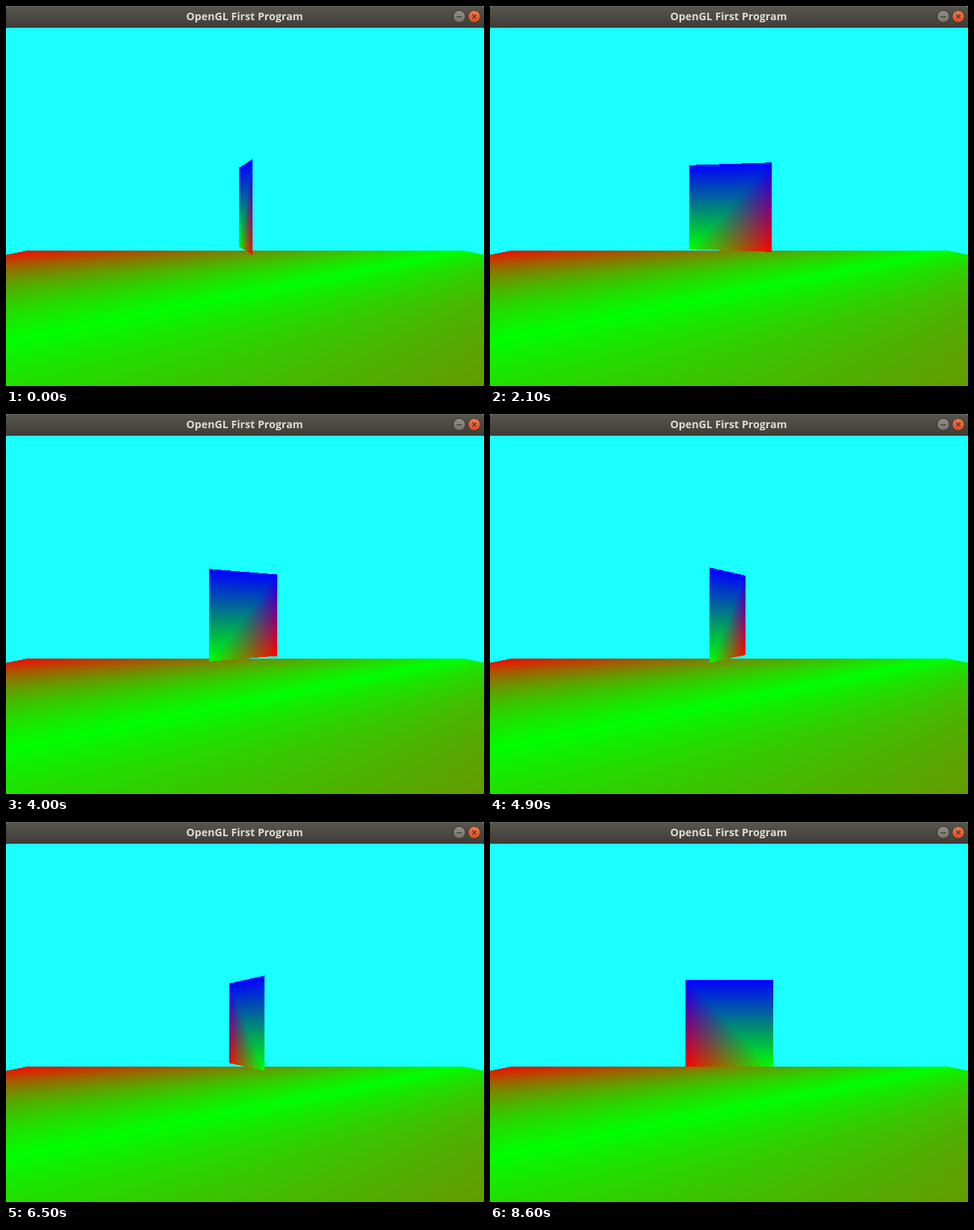
Animation of 638 by 508 pixels, one loop 8700 ms. Source, as an HTML page with a canvas:

```html
<!DOCTYPE html>
<html lang="en">
<head>
<meta charset="utf-8">
<title>OpenGL First Program</title>
<style>
  html, body { margin: 0; width: 100%; height: 100%; overflow: hidden; background: #fff; }
  svg, canvas { position: absolute; left: 0; display: block; }
  svg { top: 0; }
  canvas { top: 29px; }
  text { font: bold 14.2px "Open Sans", "Noto Sans", sans-serif; fill: #dfdbd2; }
</style>
</head>
<body>
<svg width="638" height="29" viewBox="0 0 638 29">
  <defs>
    <linearGradient id="bar" x2="0" y2="1">
      <stop stop-color="#58564e"/><stop offset="1" stop-color="#3d3c37"/>
    </linearGradient>
    <linearGradient id="grey" x2="0" y2="1">
      <stop stop-color="#918e85"/><stop offset="1" stop-color="#737169"/>
    </linearGradient>
    <linearGradient id="red" x2="0" y2="1">
      <stop stop-color="#f4784f"/><stop offset="1" stop-color="#de4c20"/>
    </linearGradient>
  </defs>
  <path d="M0 29V2Q0 0 2 0H636Q638 0 638 2V29Z" fill="url(#bar)"/>
  <path d="M2 .5H636" stroke="#67655d"/>
  <path d="M0 28.5H638" stroke="#373631"/>
  <text x="318.5" y="19" text-anchor="middle">OpenGL First Program</text>
  <g stroke="#33322d">
    <circle cx="605" cy="14" r="8.2" fill="url(#grey)"/>
    <circle cx="625" cy="14" r="8.2" fill="url(#red)"/>
    <path d="M601.5 14.5H608.5M622.3 11.3L627.7 16.7M627.7 11.3L622.3 16.7" fill="none" stroke-width="1.2"/>
  </g>
</svg>
<canvas id="view" width="638" height="479"></canvas>
<script>
const W = 638, H = 479;
const FX = 581, FY = 579.4;   // focal lengths in pixels
const CX = 319.2, CY = 240;   // vanishing point
const DIST = 10;              // camera to the spin axis
const STEP = 100, STEPS = 87;

const ctx = document.getElementById('view').getContext('2d');
const scene = ctx.createImageData(W, H);
const image = ctx.createImageData(W, H);

function put(target, x, y, r, g, b) {
  const i = (y * W + x) * 4;
  target.data[i] = r * 255;
  target.data[i + 1] = g * 255;
  target.data[i + 2] = b * 255;
  target.data[i + 3] = 255;
}

// Sky, and a floor one unit below the eye that ends under the spin axis
function buildScene() {
  for (let y = 0; y < H; y++) {
    const depth = FY / (y + 0.5 - CY);
    for (let x = 0; x < W; x++) {
      const fx = (x + 0.5 - CX) / FX * depth;
      if (depth > 0 && depth <= DIST && Math.abs(fx) <= 5) {
        const red = Math.abs(fx + 5 - depth) / 10;
        put(scene, x, y, red, 1 - red, 0);
      } else {
        put(scene, x, y, 0.1, 1, 1);
      }
    }
  }
}

// Two-triangle panel, blue along the top, red and green at the bottom corners
function drawPanel(angle) {
  const c = Math.cos(angle), s = Math.sin(angle);
  for (let x = 255; x < 385; x++) {
    const k = (x + 0.5 - CX) / FX;
    const u = DIST * k / (c + k * s);
    if (!(Math.abs(u) <= 1)) continue;
    const depth = DIST - u * s;
    const a = (1 - u) / 2;
    for (let y = 170; y < 310; y++) {
      const v = (1 - (y + 0.5 - CY) * depth / FY) / 2;
      if (v < 0 || v > 1) continue;
      const red = Math.max(0, 1 - a - v);
      put(image, x, y, red, 1 - v - red, v);
    }
  }
}

let shown = -1;
function render(time) {
  const step = Math.floor(time / STEP) % STEPS;
  if (step === shown) return;
  shown = step;
  image.data.set(scene.data);
  drawPanel((81 - 3 * step) * Math.PI / 180);
  ctx.putImageData(image, 0, 0);
}

buildScene();
const start = performance.now();
function tick() {
  render(performance.now() - start);
  requestAnimationFrame(tick);
}
tick();
</script>
</body>
</html>
```
